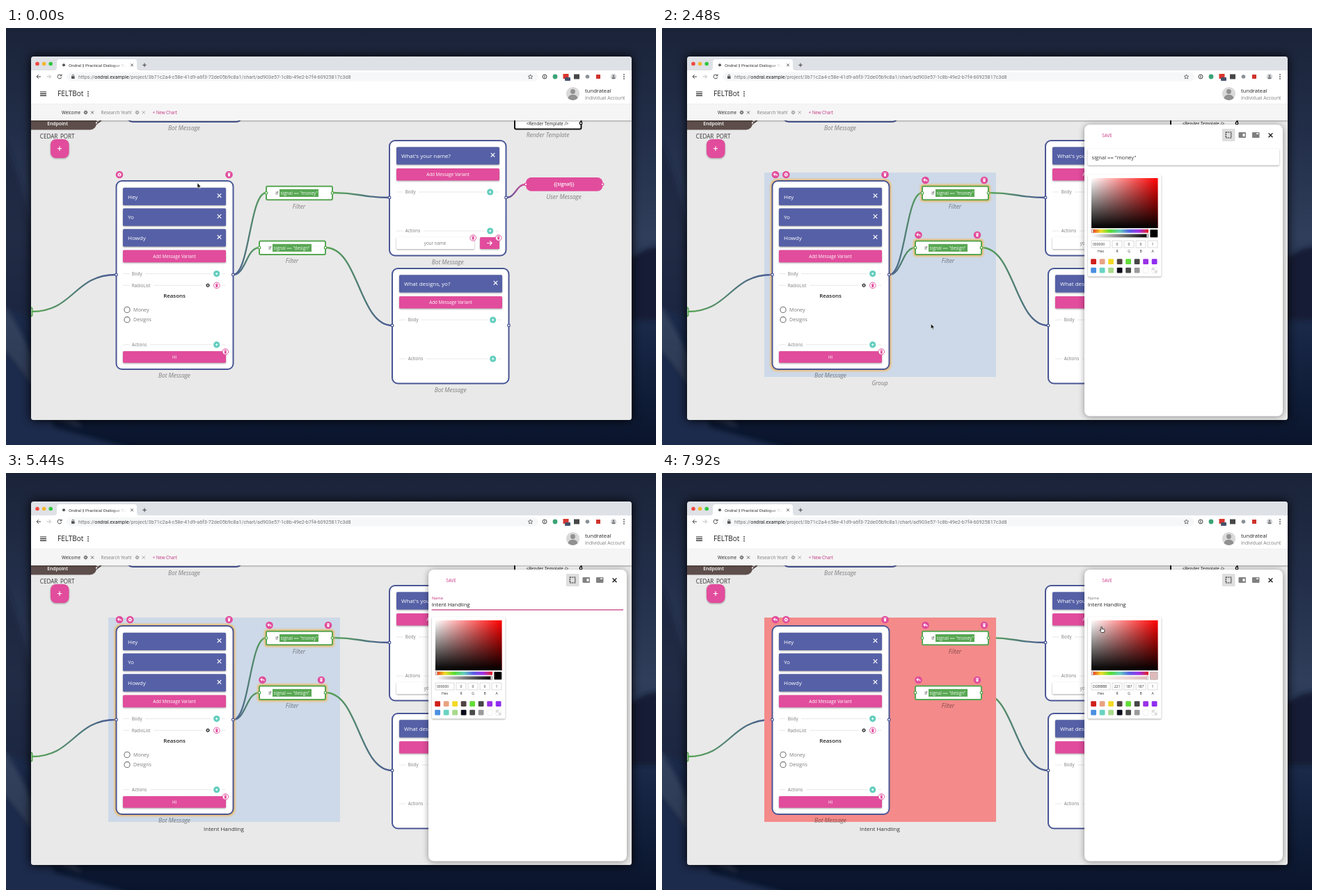
Animation of 934x600 px, one loop 8000 ms. Source, as an HTML page:

```html
<!DOCTYPE html>
<html>
<head>
<meta charset="utf-8">
<style>
html, body { margin: 0; width: 100%; height: 100%; overflow: hidden; background: #16213c }
svg { display: block; width: 100%; height: 100%; font-family: "Open Sans", "Noto Sans", sans-serif }
.ui { font-family: Roboto, Inter, sans-serif }
.it { font-style: italic }
.shadow { filter: drop-shadow(0 1px 1.2px rgba(0,0,0,.35)) }
.lift { filter: drop-shadow(0 1px 4px rgba(0,0,0,.4)) }
</style>
</head>
<body>
<svg id="stage" viewBox="0 0 934 600" xmlns="http://www.w3.org/2000/svg"></svg>
<script>
const BLUE = '#4a5796', BAR = '#5560a6', PINK = '#e14c9c', GREEN = '#58a753', TEAL = '#62cdbd', GREY = '#7d7d7d';
let defs = '', edgeCount = 0;

// y is the optical middle of the capitals
const text = (x, y, s, size, fill = '#333', more = '') =>
  `<text x="${x}" y="${y + size * .36}" font-size="${size}" fill="${fill}" ${more}>${s.replace(/&/g, '&amp;').replace(/</g, '&lt;')}</text>`;
const mid = (x, y, s, size, fill, more = '') => text(x, y, s, size, fill, 'text-anchor="middle" ' + more);
const rect = (x, y, w, h, fill, r = 0, more = '') =>
  `<rect x="${x}" y="${y}" width="${w}" height="${h}" fill="${fill}" rx="${r}" ${more}/>`;
const dot = (x, y, r, fill, more = '') => `<circle cx="${x}" cy="${y}" r="${r}" fill="${fill}" ${more}/>`;
const line = (d, c, w = 1, more = '') => `<path d="${d}" fill="none" stroke="${c}" stroke-width="${w}" ${more}/>`;
const group = (id, inner, more = '') => `<g id="${id}" ${more}>${inner}</g>`;
const cross = (x, y, r, c, w = 1) => line(`M${x - r} ${y - r}l${2 * r} ${2 * r}m0 ${-2 * r}l${-2 * r} ${2 * r}`, c, w);
const plus = (x, y, r, c, w = 1) => line(`M${x - r} ${y}h${2 * r}M${x} ${y - r}v${2 * r}`, c, w);
const kebab = (x, y, c) => [-3, 0, 3].map(d => dot(x, y + d, .9, c)).join('');
const caption = (x, y, s) => mid(x, y, s, 8.4, '#000', 'class="it" opacity=".45"');
const port = (x, y, c) => dot(x, y, 1.8, '#fff', `stroke="${c}" stroke-width="1.3"`);
const gear = (x, y, c) => dot(x, y, 1.6, 'none', `stroke="${c}" stroke-width="1.2"`) +
  dot(x, y, 2.5, 'none', `stroke="${c}" stroke-dasharray=".98 .98"`);
const trash = (x, y, c) => `<path d="M${x - 1.7} ${y - 1.3}h3.4l-.4 3.9h-2.6zM${x - 2.2} ${y - 2.4}h1.4l.3-.6h1l.3.6h1.4v.7h-4.4z" fill="${c}"/>`;
const back = (x, y) => line(`M${x - .4} ${y - 2.4}l-2 2l2 2m-2-2h3q1.8 0 1.8 2.2`, '#fff', 1.1);
const badge = (icon, x, y) => dot(x, y, 5.3, PINK) + icon(x, y, '#fff');
const bin = (x, y) => dot(x, y, 4.3, '#fff', `stroke="${PINK}" stroke-width=".9"`) + trash(x, y, PINK);
const bar = (x, y, s) => rect(x, y, 148, 25.3, BAR, 1.5, 'class="shadow"') +
  text(x + 7, y + 13, s, 8, '#fff') + cross(x + 138.5, y + 11.5, 2.8, '#fff', 1.1);
const button = (x, y, w, h, s) => rect(x, y, w, h, PINK, 1.5, 'class="shadow"') + mid(x + w / 2, y + h / 2, s, 6.3, '#fff');
const row = (x, y, s, w, end = 127) => line(`M${x} ${y}h9.5M${x + 17 + w} ${y}H${x + end}M${x + 142} ${y}h5`, '#dedede', .7) +
  text(x + 12.7, y, s, 6.3, GREY);
const addRow = (x, y, s, w) => row(x, y, s, w) + dot(x + 134.7, y, 4.6, TEAL) + plus(x + 134.7, y, 1.9, '#fff', .9);
const box = (x, y, w, h, c, r) => rect(x, y, w, h, '#fff', r, `stroke="${c}" stroke-width="2"`);
const glow = (id, x, y, w, h, r) => rect(x - 1, y - 1, w + 2, h + 2, '#f2b75c', r, `id="${id}" filter="url(#soft)" stroke="#f2b75c" stroke-width="3"`);

function gradient(id, colors, more = '') {
  defs += `<linearGradient id="${id}" ${more}>` + colors.map((c, i) =>
    `<stop offset="${i / (colors.length - 1)}" stop-color="${c}"/>`).join('') + '</linearGradient>';
  return `url(#${id})`;
}
function edge(x1, y1, x2, y2, c1, c2) {
  const m = (x1 + x2) / 2;
  const fill = gradient('edge' + edgeCount++, [c1, c2], `gradientUnits="userSpaceOnUse" x1="${x1}" x2="${x2}" y1="0" y2="0"`);
  return line(`M${x1} ${y1}C${m} ${y1} ${m} ${y2} ${x2} ${y2}`, fill, 2.3);
}
const filterNode = (x, y, word, id) => glow(id, x, y, 95, 19.5, 2) + box(x, y, 95, 19.5, GREEN, 2) +
  text(x + 13.3, y + 10, 'if', 6.4) + rect(x + 19, y + 4.3, 56, 11, GREEN) +
  text(x + 20.5, y + 10, `signal == "${word}"`, 6.4, '#eef8ee') + port(x, y + 9.7, GREEN) + port(x + 95, y + 9.7, GREEN);
const question = (x, y, s) => box(x, y, 167.5, 165.5, BLUE, 8) + bar(x + 10, y + 9.2, s) +
  button(x + 10, y + 40, 148, 17.5, 'Add Message Variant') + addRow(x + 10, y + 74, 'Body', 15) +
  addRow(x + 10, y + 130, 'Actions', 22) + port(x, y + 82, BLUE) + port(x + 167.5, y + 82, BLUE) + caption(x + 83.7, y + 174.5, 'Bot Message');

function wallpaper() {
  const sky = gradient('sky', ['#1a2338', '#222e49', '#303e5b', '#172645', '#0a152c'], 'x2="0" y2="1"');
  return rect(0, 0, 934, 600, sky) + `<g filter="url(#haze)">
    <path d="M850 350L903 328L918 319L940 314V420H850z" fill="#131d35"/>
    <path d="M-9 150Q25 210 45 330V420L-9 400z" fill="#17223d" opacity=".7"/>
    <path d="M-9 395Q25 430 48 500L110 575L-9 535z" fill="#58647c" opacity=".4"/>
    <path d="M-9 455Q40 500 70 575L200 610H-9z" fill="#1b2a4b"/></g>`;
}

function browser() {
  let s = rect(36, 41, 863, 21, '#dee1e6') + rect(36, 61, 863, 49, '#fff') +
    '<path d="M69 61q4 0 4-4v-8q0-4 4-4h107q4 0 4 4v8q0 4 4 4z" fill="#fff"/>';
  ['#f0493f', '#f5b52e', '#30c641'].forEach((c, i) => s += dot(45 + 9.6 * i, 51.5, 2.8, c));
  s += dot(83, 53.3, 2, '#555') + text(90, 53.3, 'Ondral || Practical Dialogue To', 6.2, gradient('fade', ['#333', '#333', '#333', '#333', '#fff']), 'class="ui"') +
    cross(181, 53.3, 1.8, '#444', .9) + plus(199, 53.3, 2.8, '#444') + rect(87, 63.8, 678, 12.6, '#f6f7f8', 6.3) +
    line('M50 70h-6m2.8-2.8l-2.8 2.8l2.8 2.8', '#444') + line('M58.5 70h6m-2.8-2.8l2.8 2.8l-2.8 2.8', '#bbb') +
    line('M79.4 68.3a2.9 2.9 0 1 0 .4 2.5M80 66.5v2.3h-2.4', '#444') +
    rect(94, 69.2, 4.6, 3.8, '#555', .6) + line('M95 69.5v-1.2a1.3 1.3 0 0 1 2.6 0v1.2', '#555', .8) +
    `<text x="104" y="72.5" font-size="7.2" fill="#777" class="ui">https://<tspan fill="#222">ondral.example</tspan>/project/3b71c2a4-c58e-41d9-a6f3-72de05b9c8a1/chart/ad903e57-1c8b-49e2-b7f4-60925817c3d8</text>`;
  s += line('M753.5 66.9l.9 2.1 2.3.2-1.7 1.5.5 2.3-2-1.2-2 1.2.5-2.3-1.7-1.5 2.3-.2z', '#555', .8) +
    dot(774, 70, 3, 'none', 'stroke="#444" stroke-width="1"') + rect(773.5, 68.2, 1, 3.6, '#444') +
    dot(789, 70, 3.4, '#3aa376') + rect(800.5, 66, 8, 7, '#d9362f') + rect(803, 71, 8, 5, '#46536b', 1) + rect(816, 66.5, 8, 7, '#474747') +
    dot(835.5, 70, 2.8, '#8b9096') + rect(848, 67, 6, 6, '#cf332d') + dot(873, 70, 4.3, '#d5d8dc') +
    dot(873, 69, 1.5, '#777') + rect(870.5, 71, 5, 2, '#777', 1) + kebab(888, 70, '#555');
  s += line('M49 92h9m-9 2.7h9m-9 2.7h9', '#222', 1.2) + text(74, 94.7, 'FELTBot', 10, '#222') + kebab(118, 94.7, '#333') +
    dot(814.5, 94.5, 9.6, '#d9d9d9') + dot(814.5, 91.5, 3.4, '#919191') + '<path d="M807.5 101q1-5 7-5t7 5a9.6 9.6 0 0 1-14 0z" fill="#919191"/>' +
    text(832, 90, 'tundrateal', 7.7, '#222') + text(832, 100.7, 'Individual Account', 6.7, GREY) +
    rect(36, 109.5, 863, 23.5, '#f5f5f5', 0, 'class="shadow"') + text(80, 121.7, 'Welcome', 6.3, '#222') + gear(114.5, 121.5, '#555') + cross(124, 121.5, 2, '#555', .9) +
    text(136.5, 121.7, 'Research Yeah!', 6.3, GREY) + gear(188.5, 121.5, '#999') + cross(197.7, 121.5, 2, '#999', .9) + text(210.5, 121.7, '+ New Chart', 6.2, '#c2337d');
  return s;
}

function flow() {
  return rect(36, 130, 863, 434, '#e9e9e9') + rect(147, 208, 333, 294, '#cdd9e8', 0, 'id="area"') +
    edge(37, 408, 158, 355, GREEN, BLUE) + edge(326, 355, 374, 237, BLUE, GREEN) + edge(326, 355, 364, 316, BLUE, GREEN) +
    edge(469, 237, 551, 244, GREEN, BLUE) + edge(459, 316, 555, 428, GREEN, BLUE) + edge(718.5, 244, 747, 225, BLUE, PINK) +
    line('M130 137q4-1 9-7', '#5d4e4b', 2) + box(31, 402.5, 6.5, 12, GREEN, 1) +
    rect(147, 208, 333, 294, '#fff', 0, 'id="tint"') +
    rect(26, 120, 104, 26.5, '#5d4e4b', 9) + mid(74, 137.2, 'Endpoint', 6.8, '#fff', 'font-weight="600"') + port(130, 136.5, '#5d4e4b') +
    mid(73.7, 156.2, 'CEDAR_PORT', 8.1) + box(174, 90, 165, 45, BLUE, 8) + caption(256, 144, 'Bot Message') +
    box(731, 120, 95.5, 25.5, '#111', 2) + mid(778, 137.7, '<Render Template />', 6.25, '#222') + port(826, 137, '#111') + caption(778.5, 154, 'Render Template') +
    glow('glowA', 158.5, 220, 168, 271, 8) + box(158.5, 220, 168, 271, BLUE, 8) +
    ['Hey', 'Yo', 'Howdy'].map((s, i) => bar(168, 229.7 + 29.8 * i, s)).join('') + button(168, 319.5, 148, 17.7, 'Add Message Variant') +
    addRow(168, 353.6, 'Body', 15) + row(168, 370.3, 'RadioList', 27, 115) + gear(290, 370.3, '#333') + bin(302.8, 370.3) +
    mid(242, 385, 'Reasons', 7.9, '#222', 'font-weight="600"') +
    ['Money', 'Designs'].map((s, i) => dot(174, 405.4 + 14.3 * i, 4.1, 'none', 'stroke="#777" stroke-width="1.1"') + text(183, 405.4 + 14.3 * i, s, 7.1, GREY)).join('') +
    addRow(168, 455.7, 'Actions', 22) + button(168, 465, 148, 16.7, 'Hi') + bin(315.3, 465.8) + caption(242, 499.5, 'Bot Message') +
    port(158.5, 355, BLUE) + port(326.3, 355, BLUE) + badge(trash, 320.5, 211) + group('gearA', badge(gear, 163, 211)) +
    filterNode(374, 227.7, 'money', 'glow1') + caption(421, 256.5, 'Filter') + filterNode(364, 306.5, 'design', 'glow2') + caption(411, 335, 'Filter') +
    group('bin1', badge(trash, 463, 219)) + group('bin2', badge(trash, 453, 297.7)) + group('binG', badge(trash, 474.5, 204.5)) +
    group('backs', badge(back, 163, 211) + badge(back, 378.5, 219) + badge(back, 368.5, 297.7)) +
    group('create', button(283, 504.7, 60, 16.3, 'CREATE GROUP')) + mid(313, 511, '', 8, '#333', 'id="label"') +
    question(551, 162, "What's your name?") + rect(561, 301, 112, 17, '#fff', 1.5, 'class="shadow"') + mid(616.5, 309.5, 'your name', 6.2, GREY) + bin(671.2, 302) +
    button(681, 301, 28, 17, '') + line('M691 309.5h7m-3-3.2l3.2 3.2l-3.2 3.2', '#fff', 1.2) + bin(707.7, 302) + question(555, 346, 'What designs, yo?') +
    rect(747, 215, 110.5, 19.8, PINK, 8) + mid(801.7, 225, '{{signal}}', 6.8, '#fff', 'font-weight="600"') + port(747, 225, PINK) + port(857, 225, PINK) + caption(801.7, 243, 'User Message') +
    rect(64, 160, 26.5, 27, PINK, 8, 'class="shadow"') + plus(77, 173.5, 3.2, '#fff', 1.2);
}

function picker() {
  let s = rect(612, 207, 105.5, 146.5, '#fff', 2, 'class="shadow"') + rect(617, 212, 95.5, 72, gradient('sat', ['#fff', '#f00'])) +
    rect(617, 212, 95.5, 72, 'url(#dark)') +
    rect(617, 285.7, 82, 5, gradient('hue', ['#e8201c', '#f0dc28', '#55dd33', '#62cdbd', '#5a5fe6', '#a030e8', '#e8201c'])) + rect(617, 292.5, 82, 4.8, 'url(#alpha)') +
    rect(617.5, 285.5, 2, 5.4, '#fff', .6, 'stroke="#777" stroke-width=".4"') + rect(696.5, 292.2, 2, 5.4, '#fff', .6, 'stroke="#777" stroke-width=".4"') +
    rect(701.3, 286, 11, 11.3, '#000', 1, 'id="chip" stroke="#999" stroke-width=".5"');
  ['Hex', 'R', 'G', 'B', 'A'].forEach((name, i) => {
    const x = i ? 630 + 17 * i : 617, w = i ? 14 : 27;
    s += rect(x, 302, w, 10, '#fff', 0, 'stroke="#ccc" stroke-width=".7"') +
      (i ? mid(x + 7, 307, '', 5, '#333', `id="v${i}"`) : text(x + 2, 307, '', 5, '#333', 'id="v0"')) + mid(x + w / 2, 317.5, name, 5, '#333');
  });
  ['#d0211c', '#e9a284', '#f3da25', '#4f4341', '#62dc36', '#464646', '#9a31e6', '#8f2df2', '#4a90e2', '#69d3c2', '#a9d98c', '#0a0a18', '#4a4a4a', '#9b9b9b', '#fff', '#fff']
    .forEach((c, i) => s += rect(616.2 + i % 8 * 12.5, i < 8 ? 328.3 : 340.8, 7.8, 7.8, c, 1.3, c == '#fff' ? 'stroke="#ddd" stroke-width=".5"' : ''));
  return s + rect(704, 341, 3.7, 3.7, '#ddd') + rect(707.7, 344.7, 3.7, 3.7, '#ddd');
}

function panel() {
  return rect(607, 139, 285, 419.5, '#fff', 8, 'class="lift"') + mid(639.5, 154.3, 'SAVE', 6.4, '#c83a86') + rect(805, 145, 18.5, 18, '#dedede', 1) +
    rect(810.3, 150, 7.5, 8, 'none', 0, 'stroke="#222" stroke-width="1.2" stroke-dasharray="2 1"') +
    rect(828.5, 150, 10.5, 8, '#808080', 1) + rect(834.5, 152, 3, 4, '#fff') + rect(848, 150, 10.5, 8, '#808080', 1) + rect(854, 151.3, 3, 1.5, '#fff') +
    cross(874.5, 154.3, 2.9, '#111', 1.3) +
    group('rule', rect(611.5, 174, 275.5, 23.5, '#fff', 1.5, 'class="shadow"') + text(617.5, 186, 'signal == "money"', 7.65)) +
    group('nameForm', text(611.7, 180, 'Name', 5.8, PINK, 'id="nameTag"') + text(611.7, 189.7, '', 7.6, '#222', 'id="name"') +
      rect(611.5, 196.3, 275.5, 1.2, '#c2337d', 0, 'id="underline"') + rect(612, 185, .8, 9.5, '#333', 0, 'id="caret"')) +
    group('picker', picker());
}

const pointers = group('arrow', '<path d="M0 0v7.2l1.7-1.5 1.2 2.7 1.2-.5-1.2-2.6h2.3z" fill="#111" stroke="#fff" stroke-width=".5"/>') +
  group('hand', '<path d="M-.8 0q.8-.8 1.5 0v2.6l3.2.8q.8.3.6 1.4l-.7 3h-4l-2.6-3.2q.3-1 1.3-.2l.7.5z" fill="#fff" stroke="#111" stroke-width=".8"/>') +
  group('beam', line('M-1.5-4q1.5 0 1.5 1v6q0 1-1.5 1M1.5-4q-1.5 0-1.5 1v6q0 1 1.5 1M-1 1h2', '#111', .9));

const content = wallpaper() + rect(36, 41, 863, 523, '#111', 4, 'filter="url(#drop)"') +
  `<g clip-path="url(#window)">${flow()}${browser()}${group('panel', panel())}</g>` + group('cursor', pointers);
defs += `<filter id="soft" x="-20%" y="-60%" width="140%" height="220%"><feGaussianBlur stdDeviation="1.6"/></filter>
  <filter id="haze"><feGaussianBlur stdDeviation="3"/></filter>
  <filter id="drop"><feGaussianBlur stdDeviation="7"/></filter>
  <clipPath id="window"><rect x="36" y="41" width="863" height="523" rx="3.5"/></clipPath>
  <linearGradient id="dark" x2="0" y2="1"><stop stop-opacity="0"/><stop offset="1"/></linearGradient>
  <linearGradient id="alpha"><stop stop-color="#fff"/><stop id="solid" offset="1"/></linearGradient>`;
const stage = document.getElementById('stage');
stage.innerHTML = `<defs>${defs}</defs>${content}`;

const el = id => document.getElementById(id);
const set = (id, name, value) => el(id).setAttribute(name, value);
const show = (id, on) => set(id, 'opacity', +on);
const clamp = v => Math.max(0, Math.min(1, v));
const ease = v => (v = clamp(v), v * v * (3 - 2 * v));
const mix = (a, b, k) => a + (b - a) * k;

// time, x, y, pointer used from then on
const track = [
  [0, 275, 223, 'arrow'], [160, 275, 223, 'arrow'], [400, 440, 237, 'arrow'], [480, 440, 237, 'arrow'], [640, 478, 321, 'arrow'],
  [800, 452, 316, 'arrow'], [900, 452, 316, 'arrow'], [1280, 256.5, 479, 'hand'], [1520, 256.5, 479, 'hand'], [1920, 313, 510, 'hand'],
  [2240, 313, 510, 'arrow'], [2560, 400, 410, 'arrow'], [2720, 400, 410, 'arrow'], [3280, 624, 191, 'beam'], [3600, 624, 191, ''],
  [5520, 624, 191, 'arrow'], [6080, 707.3, 217.4, 'hand'], [7300, 707.3, 217.4, 'hand'], [7680, 658.3, 215.1, 'hand'], [7920, 631.6, 221.6, 'hand'], [8000, 631.6, 221.6, 'hand']];

function pointer(t) {
  const i = track.findIndex(p => p[0] > t), a = track[i - 1], b = track[i];
  const k = ease((t - a[0]) / (b[0] - a[0]));
  return { x: mix(a[1], b[1], k), y: mix(a[2], b[2], k), kind: a[3] };
}
function picked(t) {
  const p = pointer(t), value = 255 * clamp(1 - (p.y - 212) / 72), low = value * (1 - clamp((p.x - 617) / 95.3));
  return [value, low, low].map(Math.round);
}

const TITLE = 'Intent Handling', GROUPED = 2080, FOCUS = 3360, TYPE = 3680, KEY = 82, PICK = 6080;

function draw(t) {
  const p = pointer(t), grouped = t >= GROUPED, form = t >= 2640, focused = t >= FOCUS && t < PICK;
  set('cursor', 'transform', `translate(${p.x} ${p.y})`);
  for (const kind of ['arrow', 'hand', 'beam']) show(kind, kind == p.kind);

  const fade = 1 - clamp((t - 6400) / 160);
  show('glowA', t >= 160 ? fade : 0);
  show('glow1', t >= 480 ? fade : 0);
  show('glow2', t >= 880 ? fade : 0);
  show('bin1', t >= 480);
  show('bin2', t >= 880);
  show('binG', Math.min(clamp((t - 960) / 160), clamp((1536 - t) / 160)));
  show('area', t >= 480);
  show('create', t >= 480 && !grouped);
  show('backs', grouped);
  set('gearA', 'transform', `translate(${grouped ? 15.3 : 0} 0)`);
  show('panel', t >= 600);
  set('panel', 'transform', `translate(${298 * (1 - ease((t - 600) / 300))} 0)`);

  const typed = Math.floor(Math.max(0, Math.min(TITLE.length, (t - TYPE) / KEY)));
  el('name').textContent = TITLE.slice(0, typed);
  const label = el('label');
  label.textContent = grouped ? TITLE.slice(0, typed) || 'Group' : '';
  set('label', 'class', typed ? '' : 'it');
  set('label', 'fill', typed ? '#333' : GREY);
  set('label', 'font-size', typed ? 8 : 8.4);
  set('label', 'y', typed ? 514.9 : 514);
  show('rule', !form);
  show('nameForm', form);
  set('nameTag', 'fill', focused ? '#c2337d' : GREY);
  show('underline', focused);
  const lastKey = typed ? TYPE + typed * KEY : FOCUS;
  show('caret', focused && (t - lastKey) % 1000 < 500);
  set('caret', 'x', 612 + el('name').getComputedTextLength());

  set('picker', 'transform', `translate(0 ${form ? 0 : 4})`);
  const rgb = t >= PICK ? picked(t) : [0, 0, 0];
  const css = `rgb(${rgb})`;
  set('chip', 'fill', css);
  set('solid', 'stop-color', css);
  const hex = rgb.map(v => v.toString(16).padStart(2, '0')).join('').toUpperCase();
  [hex, ...rgb, 1].forEach((v, i) => el('v' + i).textContent = v);

  // the group colour trails the picker a little
  const late = picked(Math.max(PICK, t - 240)), k = clamp((t - PICK) / 300);
  show('tint', t >= PICK);
  set('tint', 'fill', `rgb(${[205, 217, 232].map((v, i) => Math.round(mix(v, late[i], k)))})`);
}

function tick() {
  draw(Math.floor(performance.now() % 8000 / 80) * 80);
  requestAnimationFrame(tick);
}
tick();
</script>
</body>
</html>
```
